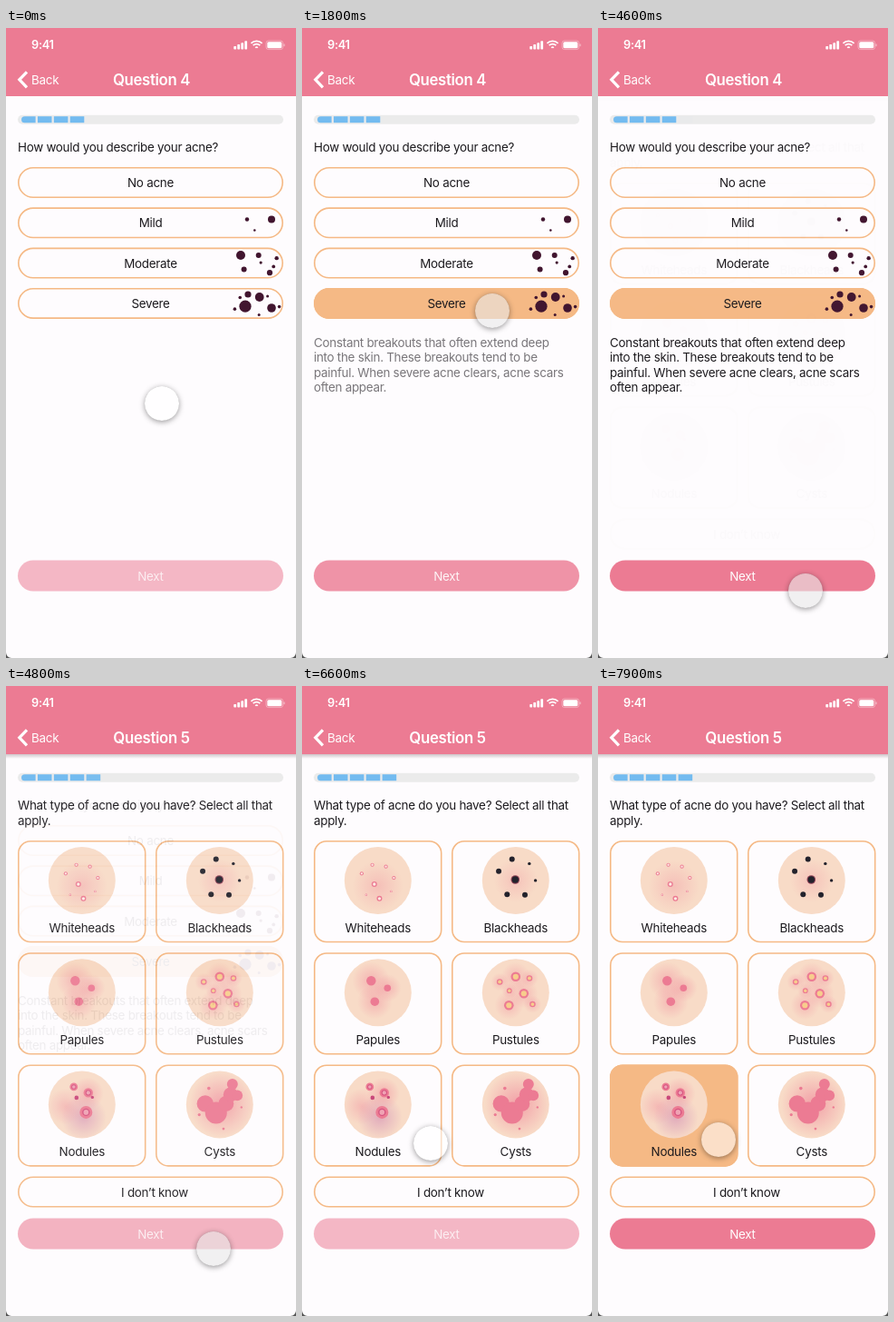
An HTML page with a canvas for the animation above (8000 ms loop, 320 by 693 pixels).

```html
<!DOCTYPE html>
<html lang="en">
<head>
<meta charset="utf-8">
<title>Skin questionnaire</title>
<style>
  html, body { margin: 0; width: 100%; height: 100%; overflow: hidden; background: #fefcfe; }
  canvas { position: absolute; left: 0; top: 0; width: 320px; height: 693px; }
</style>
</head>
<body>
<script>
(() => {
const W = 320, H = 693, LOOP = 8000, TAU = Math.PI * 2;
const PINK = '#ec7b93', PEACH = '#f5b985', PAPER = '#fefcfe', INK = '#1c1a1e',
      PLUM = '#41152f', SKIN = '#f8dbc7', BLUE = '#73bbf0';
const ROSE = '236,110,140', VIOLET = '190,100,170';
const ratio = window.devicePixelRatio || 1;

function makeLayer() {
  const canvas = document.createElement('canvas');
  canvas.width = W * ratio;
  canvas.height = H * ratio;
  document.body.append(canvas);
  const ctx = canvas.getContext('2d');
  ctx.scale(ratio, ratio);
  return ctx;
}

const severityLayer = makeLayer(), typesLayer = makeLayer(), overlay = makeLayer();

const clamp = v => Math.min(1, Math.max(0, v));
const ramp = (t, from, to) => clamp((t - from) / (to - from));
const easeInOut = k => k < 0.5 ? 2 * k * k : 1 - 2 * (1 - k) ** 2;
const easeOut = k => 1 - (1 - k) ** 2;

function withAlpha(c, alpha, draw) {
  c.save();
  c.globalAlpha *= alpha;
  draw();
  c.restore();
}

function text(c, str, x, y, { color = INK, size = 13.4, weight = 400, align = 'left' } = {}) {
  c.font = `${weight} ${size}px Inter, Roboto, sans-serif`;
  c.letterSpacing = `${-0.02 * size}px`;
  c.textAlign = align;
  c.fillStyle = color;
  c.fillText(str, x, y);
}

function box(c, x, y, w, h, r, fill) {
  c.beginPath();
  c.roundRect(x, y, w, h, r);
  c.fillStyle = fill;
  c.fill();
}

function dot(c, x, y, r, fill) {
  c.beginPath();
  c.arc(x, y, r, 0, TAU);
  c.fillStyle = fill;
  c.fill();
}

const dots = (c, list, fill) => list.forEach(([x, y, r]) => dot(c, x, y, r, fill));

// Spots spaced evenly along an ellipse; angles in degrees.
function ring(count, cx, cy, rx, ry, start, step, size) {
  return Array.from({ length: count }, (_, i) => {
    const a = (start + step * i) * TAU / 360;
    return [cx + rx * Math.cos(a), cy + ry * Math.sin(a), size(i)];
  });
}

function glow(c, x, y, r, rgb, alpha) {
  const g = c.createRadialGradient(x, y, 0, x, y, r);
  g.addColorStop(0, `rgba(${rgb},${alpha})`);
  g.addColorStop(1, `rgba(${rgb},0)`);
  dot(c, x, y, r, g);
}

function outlined(c, x, y, w, h, r, filled = 0) {
  box(c, x, y, w, h, r, PAPER);
  withAlpha(c, filled, () => box(c, x, y, w, h, r, PEACH));
  c.beginPath();
  c.roundRect(x + 0.8, y + 0.8, w - 1.6, h - 1.6, r - 0.8);
  c.strokeStyle = PEACH;
  c.lineWidth = 1.6;
  c.stroke();
}

function pill(c, label, y, filled = 0, labelX = 159.5) {
  outlined(c, 13, y - 17, 293, 34, 17, filled);
  text(c, label, labelX, y + 5, { align: 'center' });
}

function nextButton(c, active) {
  withAlpha(c, 0.53 + 0.47 * active, () => box(c, 13, 585.5, 293, 34, 17, PINK));
  withAlpha(c, 0.75 + 0.25 * active, () =>
    text(c, 'Next', 159.5, 607.5, { color: '#fff', align: 'center' }));
}

function statusIcons(c) {
  for (let i = 0; i < 4; i++) {
    const h = 3.4 + i * 1.9;
    box(c, 251.3 + i * 4, 23.4 - h, 2.8, h, 0.7, '#fff');
  }
  c.strokeStyle = '#fff';
  c.lineWidth = 1.7;
  for (const r of [8.6, 5.4, 1.8]) {
    c.beginPath();
    c.arc(276.5, 23, r, -TAU * 0.375, -TAU * 0.125);
    c.stroke();
  }
  c.beginPath();
  c.roundRect(287, 14, 18.6, 9.6, 2.6);
  c.strokeStyle = 'rgba(255,255,255,.45)';
  c.lineWidth = 0.8;
  c.stroke();
  box(c, 288.3, 15.3, 16, 7, 1.5, '#fff');
  box(c, 306.4, 17.3, 1.2, 3, 0.6, 'rgba(255,255,255,.5)');
}

function pageFrame(c, number, shadow) {
  c.fillStyle = PAPER;
  c.fillRect(0, 0, W, H);
  if (shadow) {
    const g = c.createLinearGradient(0, 75, 0, 80);
    g.addColorStop(0, 'rgba(60,30,40,.25)');
    g.addColorStop(1, 'rgba(60,30,40,0)');
    c.fillStyle = g;
    c.fillRect(0, 75, W, 5);
  }
  c.fillStyle = PINK;
  c.fillRect(0, 0, W, 75);
  text(c, '9:41', 28, 23, { color: '#fff', size: 12.8, weight: 600 });
  statusIcons(c);
  c.beginPath();
  c.moveTo(23, 48.3);
  c.lineTo(14.8, 56.8);
  c.lineTo(23, 65.3);
  c.strokeStyle = '#fff';
  c.lineWidth = 3.2;
  c.stroke();
  text(c, 'Back', 28, 61.7, { color: '#fff' });
  text(c, 'Question ' + number, 160.5, 63, { color: '#fff', size: 16.8, weight: 600, align: 'center' });

  box(c, 13, 95.7, 293, 10, 5, '#ebebeb');
  for (let i = 0; i < number; i++) {
    box(c, 17 + i * 17.9, 97.2, 15.6, 7, i ? 0 : [3.5, 0, 0, 3.5], BLUE);
  }
}

const SPOTS = [
  [266, 210.5, 2.2], [293, 210.5, 4], [274.3, 222.5, 1.3],
  [259, 250, 5], [278.7, 250, 3], [262.6, 265.5, 3], [291, 269.2, 3.1],
  ...ring(3, 291, 257, 10, 6, -40, 105, i => 2.2 - i * 0.3),
  [264, 306.2, 6.6], [279.7, 296, 4.9], [293, 308, 4.8], [267, 293, 3.6],
  ...ring(5, 276, 304.5, 26, 11, -133, 72, i => 1.8 - (i % 2) * 0.3),
];
const ADVICE = ['Constant breakouts that often extend deep', 'into the skin. These breakouts tend to be',
  'painful. When severe acne clears, acne scars', 'often appear.'];

function drawSeverity(c, t) {
  const fade = ramp(t, 1550, 1975);
  pageFrame(c, 4, false);
  text(c, 'How would you describe your acne?', 13, 136);
  ['No acne', 'Mild', 'Moderate', 'Severe'].forEach((label, i) =>
    pill(c, label, 170 + i * 44.3, i === 3 ? ramp(t, 1550, 1750) : 0));
  dots(c, SPOTS, PLUM);
  withAlpha(c, fade, () => ADVICE.forEach((line, i) => text(c, line, 13, 350.8 + i * 16.35)));
  nextButton(c, fade);
}

// Lesions are placed relative to the centre of the skin disc.
function cored(c, list, core, share) {
  for (const [x, y, r] of list) {
    dot(c, x, y, r, PINK);
    dot(c, x, y, r * share, core);
  }
}

function whiteheads(c) {
  glow(c, 0, 6, 28, ROSE, 0.25);
  const around = ring(7, -1, 1, 19, 19, -153, 47, i => i === 5 ? 3 : i > 3 ? 1.2 : 2.1);
  cored(c, [...around, [-4, 4, 3]], '#fdebe4', 0.55);
}

function blackheads(c) {
  glow(c, 0, 0, 24, ROSE, 0.22);
  dot(c, -0.5, -1, 4.8, '#8d4256');
  const around = ring(6, 1, -3, 21, 21, -160, 56, i => i % 4 < 2 ? 3 : 1.7);
  dots(c, [...around, [-0.5, -1, 3.7]], '#23222c');
}

function papules(c) {
  const spots = [[-7.5, -13, 5.2], [10.5, -5, 3.8], [-3.5, 10, 4.8]];
  spots.forEach(([x, y, r]) => glow(c, x, y, r * 4, ROSE, 0.35));
  dots(c, spots, PINK);
}

function pustules(c) {
  const spots = [[0, -17.5, 5.3], [9, 1, 5.3], [-7.5, 14, 5.3], [-7, -2, 2.9],
    ...ring(3, 1, 0, 23, 20, -144, 92, () => 3.3)];
  spots.forEach(([x, y, r]) => glow(c, x, y, r * 3, ROSE, 0.3));
  cored(c, spots, '#f8cd8c', 0.58);
}

function nodules(c) {
  glow(c, 2, 14, 25, VIOLET, 0.4);
  glow(c, -18, 2, 20, ROSE, 0.3);
  glow(c, 6, -12, 18, ROSE, 0.4);
  const bumps = [[-9, -19.5, 4.4], [7, -13, 5.2], [4.5, 8.5, 7]];
  cored(c, bumps, '#d65480', 0.6);
  bumps.forEach(([x, y, r]) => dot(c, x, y, r * 0.4, '#f0a3b4'));
  dots(c, [[-6, -7.5, 2.3], [11.5, -8, 1.7]], '#c9487a');
}

function cysts(c) {
  glow(c, 2, 0, 36, ROSE, 0.55);
  dots(c, [[-16, -1, 9.2], [-4, 9, 12], [7, -1, 8.5], [12, -11, 8], [14, -22.5, 6], [19.5, -10, 5.8],
    ...ring(4, 0, 3, 24, 24, 0, 80, i => 1.2 + i * 0.2)], PINK);
}

const TYPES = [['Whiteheads', whiteheads], ['Blackheads', blackheads], ['Papules', papules],
  ['Pustules', pustules], ['Nodules', nodules], ['Cysts', cysts]];

function card(c, [label, lesions], index, filled) {
  const x = 13 + (index % 2) * 152, y = 170 + Math.floor(index / 2) * 123.2;
  const cx = x + 70.8, cy = y + 44;
  outlined(c, x, y, 141.5, 112.3, 14, filled);
  c.save();
  c.translate(cx, cy);
  dot(c, 0, 0, 37, SKIN);
  c.clip();
  lesions(c);
  c.restore();
  text(c, label, cx, y + 100.7, { align: 'center' });
}

function drawTypes(c, t) {
  pageFrame(c, 5, true);
  text(c, 'What type of acne do you have? Select all that', 13, 136);
  text(c, 'apply.', 13, 152.5);
  TYPES.forEach((type, i) => card(c, type, i, i === 4 ? ramp(t, 7100, 7300) : 0));
  pill(c, 'I don’t know', 556.5, 0, 164);
  nextButton(c, ramp(t, 7100, 7525));
}

const MOVES = [
  { from: 400, to: 1100, x: 210, y: 311 },
  { from: 1800, to: 2650, x: 228, y: 450 },
  { from: 3300, to: 4200, x: 229, y: 619 },
  { from: 5150, to: 6300, x: 142, y: 503 },
  { from: 6650, to: 7050, x: 133, y: 499 },
];
const TAPS = [1550, 4550, 7100];

function pointerAt(t) {
  let x = 172, y = 413;
  for (const move of MOVES) {
    const k = easeInOut(ramp(t, move.from, move.to));
    x += (move.x - x) * k;
    y += (move.y - y) * k;
  }
  return { x, y };
}

function drawPointer(c, t) {
  const { x, y } = pointerAt(t), r = 19;
  const press = Math.max(...TAPS.map(tap =>
    ramp(t, tap - 50, tap + 50) * (1 - ramp(t, tap + 300, tap + 500))));
  // Keep the shadow outside the translucent disc.
  c.save();
  c.beginPath();
  c.rect(0, 0, W, H);
  c.arc(x, y, r, 0, TAU);
  c.clip('evenodd');
  c.shadowColor = 'rgba(0,0,0,.42)';
  c.shadowBlur = 6 * ratio;
  c.shadowOffsetY = 1.5 * ratio;
  dot(c, x, y, r - 0.3, '#000');
  c.restore();
  dot(c, x, y, r, `rgba(0,0,0,${0.12 * press})`);
  dot(c, x, y, r, 'rgba(255,255,255,.55)');
}

function drawCorners(c) {
  c.beginPath();
  c.rect(0, H - 8, W, 8);
  c.roundRect(0, H - 8, W, 8, [0, 0, 6, 6]);
  c.fillStyle = '#555';
  c.fill('evenodd');
}

function render(t) {
  const reveal = easeOut(ramp(t, 4600, 4870));
  typesLayer.canvas.style.opacity = reveal;
  if (reveal < 1) drawSeverity(severityLayer, t);
  if (reveal > 0) drawTypes(typesLayer, t);
  overlay.clearRect(0, 0, W, H);
  drawPointer(overlay, t);
  drawCorners(overlay);
}

function tick() {
  render(performance.now() % LOOP);
  requestAnimationFrame(tick);
}
tick();
})();
</script>
</body>
</html>
```
